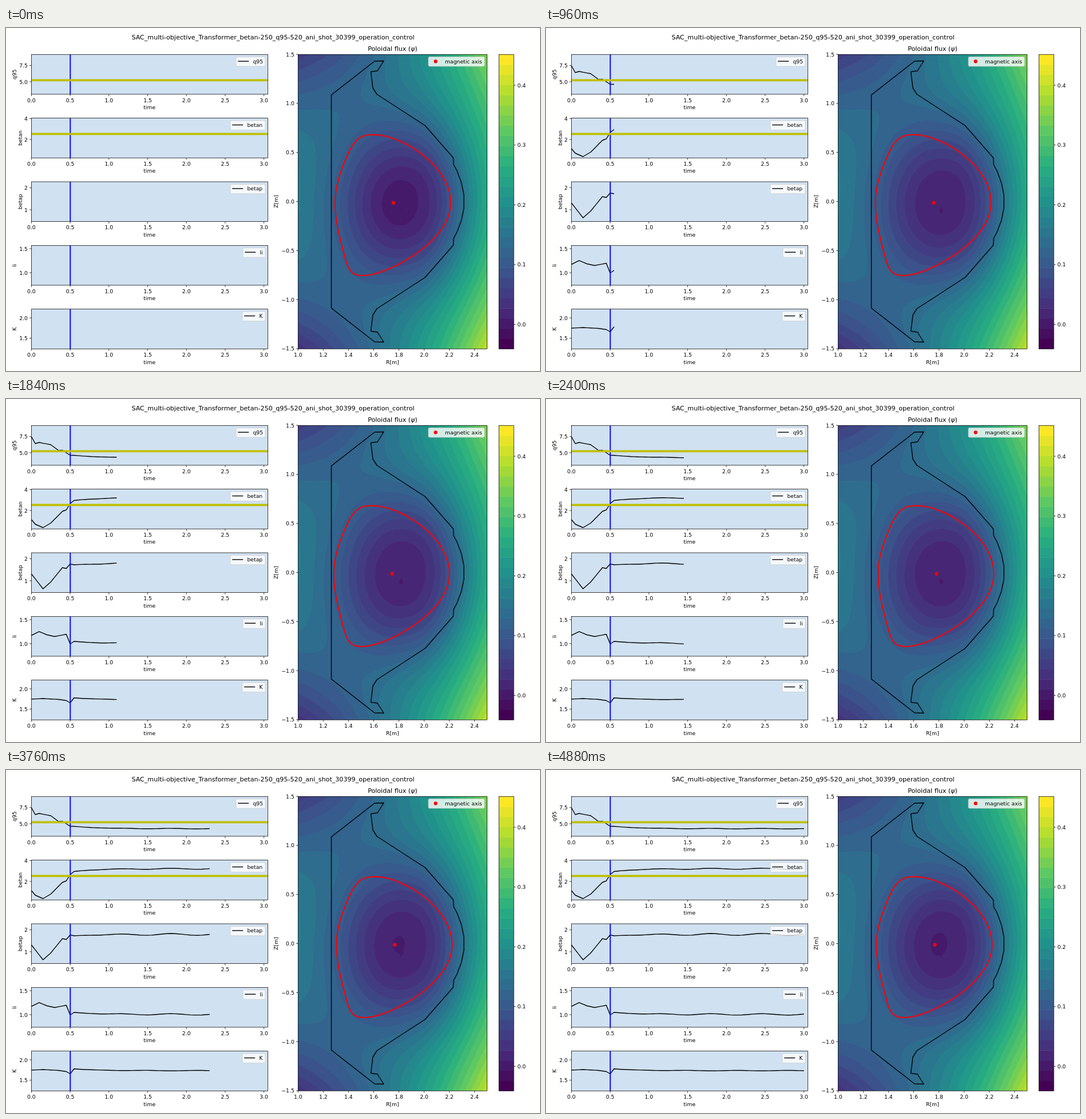
Animation of 933x600 px, one loop 4960 ms. Source, as an HTML page with a canvas:

```html
<!DOCTYPE html>
<html lang="en">
<head>
<meta charset="utf-8">
<title>Poloidal flux</title>
<style>
html, body { margin: 0; width: 100%; height: 100%; overflow: hidden; background: #fff; }
canvas { position: absolute; left: 510px; top: 46px; }
svg { position: absolute; left: 0; top: 0; }
text { font: 9.26px "DejaVu Sans", sans-serif; fill: #000; }
.big { font-size: 11.11px; }
.mid { text-anchor: middle; }
.end { text-anchor: end; }
.axis { fill: none; stroke: #000; stroke-width: .75; }
.line { fill: none; stroke: #000; stroke-width: 1.4; stroke-linejoin: round; }
.legend { fill: #fff; fill-opacity: .8; stroke: #ccc; stroke-opacity: .8; stroke-width: .9; }
</style>
</head>
<body>
<canvas id="flux" width="331" height="515"></canvas>
<svg id="plot" width="933" height="600" viewBox="0 0 933 600"></svg>
<script>
const STEP = 80, FRAMES = 62, DT = .05;
const X0 = 510, Y0 = 46, W = 331, H = 515, BANDS = 29;

// head: [step, y] corners of the start-up phase; after it the trace
// settles from `from` to `to` with a ripple of height `amp`.
const PANELS = [
  { name: 'q95', lx: 17, box: 402, ticks: [['7.5', 65.5], ['5.0', 94]], goal: 91.4,
    head: [[0, 66], [1, 78], [2, 76], [5, 80], [7, 90], [8, 89.5], [10, 98.5]],
    from: 98.5, to: 102.6, amp: -.4 },
  { name: 'betan', lx: 27, box: 392, ticks: [['4', 158.5], ['2', 195]], goal: 185.3,
    head: [[0, 211], [1, 219], [3, 225], [5, 217], [8, 196.5], [9, 194], [10, 183]],
    from: 177.5, to: 172.7, amp: -.9 },
  { name: 'betap', lx: 27, box: 392, ticks: [['2', 279.5], ['1', 318]],
    head: [[0, 306], [3, 332], [5, 320], [8, 295], [9, 296.5], [10, 288.5]],
    from: 290, to: 287.6, amp: -1.6 },
  { name: 'li', lx: 17, box: 414, ticks: [['1.5', 386], ['1.0', 428]],
    head: [[0, 413.5], [2, 406.8], [4, 412.5], [6, 415.5], [9, 411.5], [10, 428.5]],
    from: 424, to: 427.5, amp: -1.2 },
  { name: 'K', lx: 17, box: 413, ticks: [['2.0', 507], ['1.5', 542.5]],
    head: [[0, 525], [3, 524], [7, 525.5], [9, 527.5], [10, 531.5]],
    from: 522.8, to: 525.9, amp: .4 }
];

// Upper half of the wall, mirrored about MID_Y
const MID_Y = 303.5;
const WALL = [[568.5, 117], [644, 58], [660, 57.5], [649, 75], [637.5, 76.5], [641, 105],
  [648, 116], [732, 170.5], [781.5, 227], [782, 239], [788, 250], [795.5, 270], [800, 292]];
const VESSEL = [...WALL, ...WALL.map(([x, y]) => [x, 2 * MID_Y - y]).reverse()].join(' ');

const VIRIDIS = '440154 472d7b 3b528b 2c728e 21918c 28ae80 5ec962 addc30 fde725'
  .split(' ').map(h => [0, 2, 4].map(i => parseInt(h.substr(i, 2), 16)));

const lerp = (a, b, u) => a + (b - a) * u;
const clamp = (v, lo, hi) => Math.max(lo, Math.min(hi, v));
const colors = Array.from({ length: BANDS }, (_, k) => {
  const p = k / (BANDS - 1) * 8, i = Math.min(7, Math.floor(p));
  return VIRIDIS[i].map((c, j) => Math.round(lerp(c, VIRIDIS[i + 1][j], p - i)));
});

// Static chart parts
const label = (s, x, y, cls = 'mid') => `<text x="${x}" y="${y}" class="${cls}">${s}</text>`;
const upright = (s, x, y) => `<text class="mid" transform="translate(${x} ${y}) rotate(-90)">${s}</text>`;
const path = (d, cls, extra = '') => `<path d="${d}" class="${cls}" ${extra}/>`;
const rect = (x, y, w, h, cls, extra = '') =>
  `<rect x="${x}" y="${y}" width="${w}" height="${h}" class="${cls}" ${extra}/>`;
const xTick = (s, x, y) => path(`M${x} ${y}v3.3`, 'axis') + label(s, x, y + 13.8);
const yTick = (s, x, y) => path(`M${x} ${y}h-3.3`, 'axis') + label(s, x - 6.5, y + 3.5, 'end');
const timeX = t => 44.4 + t * 135.4;

function panel(p, i) {
  const box = p.box, top = 46.3 + i * 111.35, bottom = top + 69.6;
  let s = rect(44.4, top, 413, 69.6, '', 'fill="#d0e1f1"') + path('', 'line', `id="trace${i}"`);
  s += path(`M112.3 ${top}V${bottom}`, '', 'stroke="#00f" stroke-width="1.9"');
  if (p.goal) s += path(`M44.4 ${p.goal}H457.4`, '', 'stroke="#bfbf00" stroke-width="3.7"');
  s += rect(44.4, top, 413, 69.6, 'axis');
  for (let t = 0; t <= 3; t += .5) s += xTick(t.toFixed(1), timeX(t), bottom);
  for (const [v, y] of p.ticks) s += yTick(v, 44.4, y);
  s += label('time', 250.7, bottom + 26.2) + upright(p.name, p.lx + 1, top + 34.8);
  s += rect(box, top + 4.4, 453 - box, 16.4, 'legend', 'rx="2"');
  s += path(`M${box + 3.2} ${top + 11.9}h19`, 'line') + label(p.name, box + 29.5, top + 15.4, '');
  return s;
}

function fluxChart() {
  let s = `<polygon points="${VESSEL}" class="line"/>`;
  s += path('', '', 'id="edge" fill="none" stroke="#f00" stroke-width="2"');
  s += '<circle id="core" r="3.1" cy="305.7" fill="#f00"/>';
  s += rect(510.3, 46.3, 330.3, 515, 'axis');
  for (let i = 0; i < 8; i++) s += xTick((1 + i * .2).toFixed(1), 510.3 + i * 44.05, 561.3);
  for (let i = -3; i <= 3; i++)
    s += yTick((i < 0 ? '\u2212' : '') + Math.abs(i / 2).toFixed(1), 510.3, MID_Y - i * 85.83);
  s += label('R[m]', 675.4, 588) + upright('Z[m]', 475, MID_Y);
  s += label('Poloidal flux (<tspan font-style="italic">ψ</tspan>)', 675.5, 40, 'mid big');
  s += rect(738, 50.6, 98, 16.4, 'legend', 'rx="2"');
  s += '<circle cx="750.6" cy="58.4" r="3.1" fill="#f00"/>' + label('magnetic axis', 767, 61.6, '');
  return s;
}

function colorBar() {
  const h = 515 / BANDS;
  let s = colors.map((c, k) =>
    rect(861, 561.3 - (k + 1) * h, 26, h + (k ? .5 : 0), '', `fill="rgb(${c})"`)).join('');
  s += rect(861.2, 46.3, 26, 515, 'axis');
  for (let i = 0; i < 5; i++) {
    const y = 518.5 - i * 104.6;
    s += path(`M887.2 ${y}h3.3`, 'axis') + label((i / 10).toFixed(1), 893.5, y + 3.5, '');
  }
  return s;
}

document.getElementById('plot').innerHTML = PANELS.map(panel).join('') + fluxChart() + colorBar() +
  label('SAC_multi-objective_Transformer_betan-250_q95-520_ani_shot_30399_operation_control',
    466.5, 20, 'mid big');

// Flux in colour bands: a saddle-like outer field minus the plasma well
function level(x, y) {
  const u = (x - 675) / 165, v = (y - MID_Y) / 257.5;
  const rim = 12 + 9.2 * u + 2.7 * u * u + .6 * u ** 3;
  const outer = rim + (1 - v * v) * (.9 - 7 * u) + v * (.4 + .95 * u);
  const q = Math.hypot((x - 715) / (x < 715 ? 140 : 94), (y - 308) / 147);
  const notch = Math.max(0, 1 - Math.abs(x - 690) / 5 - Math.abs(y - 319) / 8);
  return outer - 10.1 * Math.exp(-(q ** 2.6)) - .6 * notch;
}

const base = new Float32Array(W * H), well = new Float32Array(W * H);
for (let i = 0; i < W * H; i++) {
  const x = X0 + i % W, y = Y0 + Math.floor(i / W);
  base[i] = level(x, y);
  well[i] = Math.exp(-((x - 689) ** 2 + (y - 306) ** 2) / 4900);
}

const ctx = document.getElementById('flux').getContext('2d');
const image = ctx.createImageData(W, H);
const pixels = new Uint32Array(image.data.buffer);
const packed = colors.map(([r, g, b]) => (255 << 24 | b << 16 | g << 8 | r) >>> 0);

function drawFlux(depth) {
  for (let i = 0; i < pixels.length; i++)
    pixels[i] = packed[clamp(Math.floor(base[i] - depth * well[i]), 0, BANDS - 1)];
  ctx.putImageData(image, 0, 0);
}

// D-shaped plasma edge, more pointed below and flattened on the inner side
function edgePath(shift) {
  const pts = [];
  for (let a = 0; a < 360; a += 3) {
    const th = a * Math.PI / 180, s = Math.sin(th), lower = s < 0;
    const flat = Math.cos(th) < 0 ? 8 * Math.sin(2 * th) ** 2 : 0;
    const x = 679.3 + shift + 101 * Math.cos(th + (lower ? .55 : .35) * s) + flat;
    pts.push(`${x.toFixed(2)} ${(306 - (lower ? 127 : 119.5) * s).toFixed(2)}`);
  }
  return `M${pts.join('L')}Z`;
}

function traceY(p, step) {
  const i = p.head.findIndex(k => k[0] >= step);
  if (i === 0) return p.head[0][1];
  if (i > 0) {
    const [a, b] = [p.head[i - 1], p.head[i]];
    return lerp(a[1], b[1], (step - a[0]) / (b[0] - a[0]));
  }
  const t = step * DT, since = t - .55;
  const ripple = p.amp * Math.min(1, since) * Math.cos((t - 1.8) / .66 * 2 * Math.PI);
  return lerp(p.to, p.from, Math.exp(-since / .3)) + ripple;
}

function tracePath(p, last) {
  if (last < 1) return '';
  const pts = Array.from({ length: last + 1 }, (_, i) => `${timeX(i * DT)} ${traceY(p, i)}`);
  return `M${pts.join('L')}`;
}

const edge = document.getElementById('edge'), core = document.getElementById('core');
const traces = PANELS.map((_, i) => document.getElementById('trace' + i));

function draw(step) {
  const start = Math.exp(-step / 4);
  const shift = -1.8 + 3.8 * Math.cos((step - 30) / 14 * 2 * Math.PI) - 4 * start;
  drawFlux(.75 * start + .25 * step / FRAMES);
  edge.setAttribute('d', edgePath(shift));
  core.setAttribute('cx', 680.3 + shift);
  PANELS.forEach((p, i) => traces[i].setAttribute('d', tracePath(p, step - 1)));
}

let shown = -1;
function tick() {
  const step = Math.floor(performance.now() / STEP) % FRAMES;
  if (step !== shown) draw(shown = step);
  requestAnimationFrame(tick);
}
tick();
</script>
</body>
</html>
```
